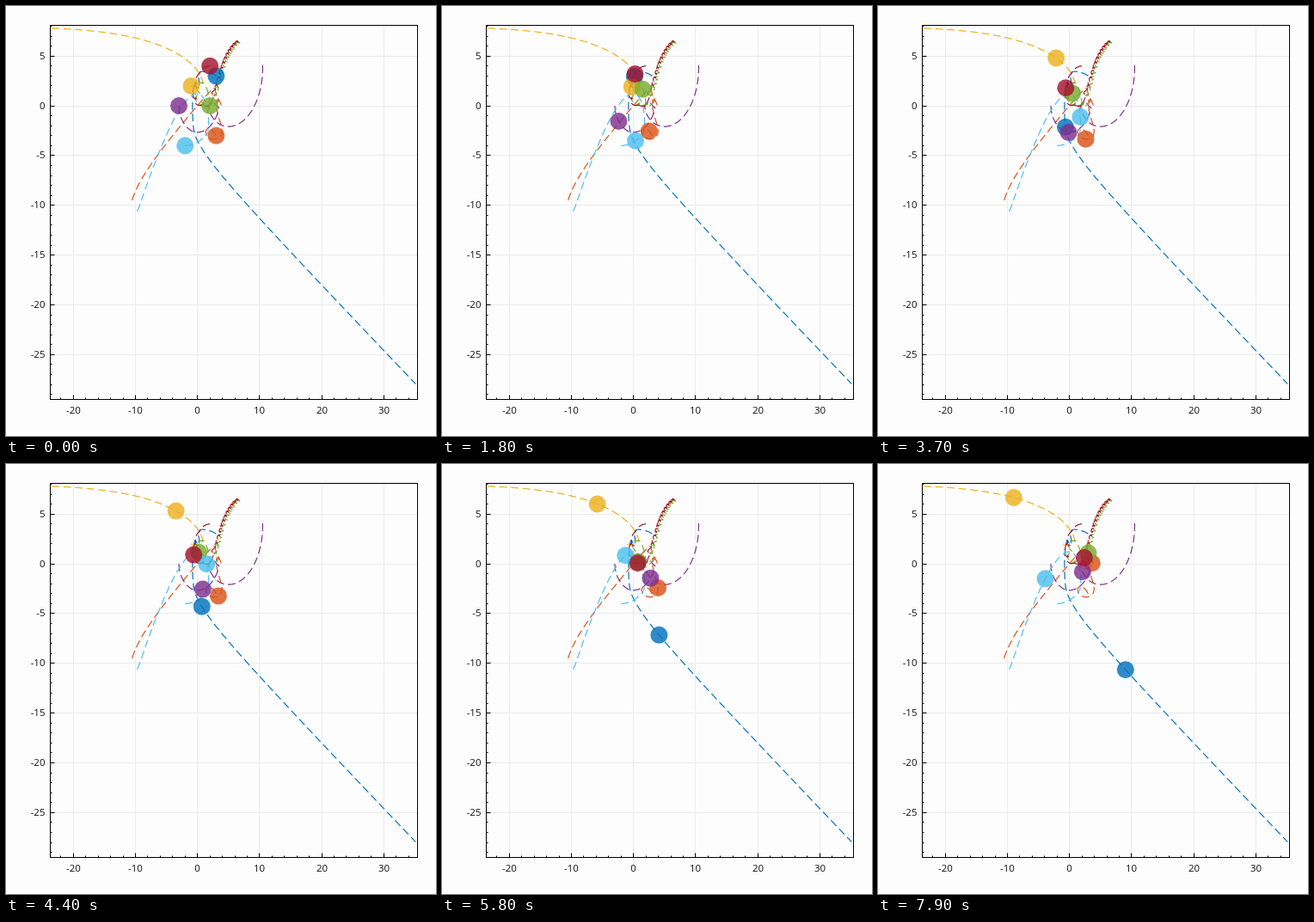
An HTML page with a canvas that plays this animation: 500 px wide and 500 px high, repeating every 8 s.

```html
<!DOCTYPE html>
<html lang="en">
<meta charset="utf-8">
<title>Seven-body problem</title>
<style>
  html, body { margin: 0; width: 100%; height: 100%; overflow: hidden; background: #fdfdfd; }
  canvas { display: block; }
</style>
<canvas id="stage" width="500" height="500"></canvas>
<script>
const ctx = document.getElementById('stage').getContext('2d');
const COLORS = ['#0072bd', '#d95319', '#edb120', '#7e2f8e', '#77ac30', '#4dbeee', '#a2142f'];
const N = COLORS.length;
const FRAMES = 80, FRAME_MS = 100;
const END_TIME = 14, SAMPLES = 199, SUBSTEPS = 8; // samples: one per picture
const BOX = { l: 51.5, t: 22.5, r: 478.5, b: 457.5 };
const px = x => 222.7 + 7.22 * x;
const py = y => 116.05 - 11.57 * y;

// State: seven x, seven y, then their velocities. Body i has mass i + 1.
const START = [
  3, 3, -1, -3, 2, -2, 2,
  3, -3, 2, 0, 0, -4, 4,
  0, 0, 0, 0, 0, 1.75, -1.5,
  0, 0, 0, -1.25, 1, 0, 0
];

let tightest; // smallest squared time scale among all pairs

function derive(s) {
  const d = new Float64Array(4 * N);
  tightest = Infinity;
  for (let k = 0; k < 2 * N; k++) d[k] = s[2 * N + k];
  for (let i = 0; i < N; i++) {
    for (let j = i + 1; j < N; j++) {
      const dx = s[j] - s[i], dy = s[j + N] - s[i + N];
      const r2 = dx * dx + dy * dy, r3 = r2 * Math.sqrt(r2);
      const a = (j + 1) / r3, b = (i + 1) / r3;
      d[2 * N + i] += a * dx;
      d[3 * N + i] += a * dy;
      d[2 * N + j] -= b * dx;
      d[3 * N + j] -= b * dy;
      tightest = Math.min(tightest, r3 / (i + j + 2));
    }
  }
  return d;
}

const shift = (s, d, h) => s.map((v, k) => v + h * d[k]);

// Runge-Kutta with steps that shrink during close encounters
function advance(s, span) {
  while (span > 1e-12) {
    const a = derive(s);
    const h = Math.min(span, 0.004, 0.02 * Math.sqrt(tightest));
    const b = derive(shift(s, a, h / 2));
    const c = derive(shift(s, b, h / 2));
    const d = derive(shift(s, c, h));
    s = s.map((v, k) => v + h / 6 * (a[k] + 2 * b[k] + 2 * c[k] + d[k]));
    span -= h;
  }
  return s;
}

const states = [Float64Array.from(START)];
while (states.length <= SAMPLES * SUBSTEPS) {
  states.push(advance(states[states.length - 1], END_TIME / SAMPLES / SUBSTEPS));
}

const paths = COLORS.map((_, i) => {
  const path = new Path2D();
  states.forEach(s => path.lineTo(px(s[i]), py(s[i + N])));
  return path;
});

function line(x1, y1, x2, y2, color) {
  ctx.strokeStyle = color;
  ctx.beginPath();
  ctx.moveTo(x1, y1);
  ctx.lineTo(x2, y2);
  ctx.stroke();
}

const snap = v => Math.floor(v) + 0.5;

function drawAxes() {
  ctx.font = '11.5px "Open Sans", "Noto Sans", sans-serif';
  ctx.fillStyle = '#111';
  ctx.lineWidth = 1;
  for (let v = -22; v <= 34; v += 2) {
    const x = snap(px(v)), major = v % 10 === 0;
    if (major) {
      line(x, BOX.t, x, BOX.b, '#ebebeb');
      ctx.textAlign = 'center';
      ctx.fillText(v, x, 474);
    }
    line(x, BOX.b, x, BOX.b - (major ? 5 : 2), '#000');
  }
  for (let v = -29; v <= 8; v++) {
    const y = snap(py(v)), major = v % 5 === 0;
    if (major) {
      line(BOX.l, y, BOX.r, y, '#ebebeb');
      ctx.textAlign = 'right';
      ctx.fillText(v, 45.5, y + 3.5);
    }
    line(BOX.l, y, BOX.l + (major ? 5 : 2), y, '#000');
  }
  ctx.strokeStyle = '#000';
  ctx.strokeRect(BOX.l, BOX.t, BOX.r - BOX.l, BOX.b - BOX.t);
}

function drawPaths() {
  ctx.save();
  ctx.beginPath();
  ctx.rect(BOX.l, BOX.t, BOX.r - BOX.l, BOX.b - BOX.t);
  ctx.clip();
  ctx.lineWidth = 1.2;
  ctx.setLineDash([9, 4.5]);
  paths.forEach((path, i) => {
    ctx.strokeStyle = COLORS[i];
    ctx.stroke(path);
  });
  ctx.restore();
}

function drawBodies(s) {
  ctx.globalAlpha = 0.82;
  COLORS.forEach((color, i) => {
    ctx.fillStyle = color;
    ctx.beginPath();
    ctx.arc(px(s[i]), py(s[i + N]), 10, 0, 2 * Math.PI);
    ctx.fill();
  });
  ctx.globalAlpha = 1;
}

function draw(frame) {
  ctx.fillStyle = '#fdfdfd';
  ctx.fillRect(0, 0, 500, 500);
  drawAxes();
  drawPaths();
  drawBodies(states[frame * SUBSTEPS]);
}

const begin = performance.now();
let shown = -1;
function tick() {
  const frame = Math.floor((performance.now() - begin) / FRAME_MS) % FRAMES;
  if (frame !== shown) draw(shown = frame);
  requestAnimationFrame(tick);
}
tick();
</script>
</html>
```
